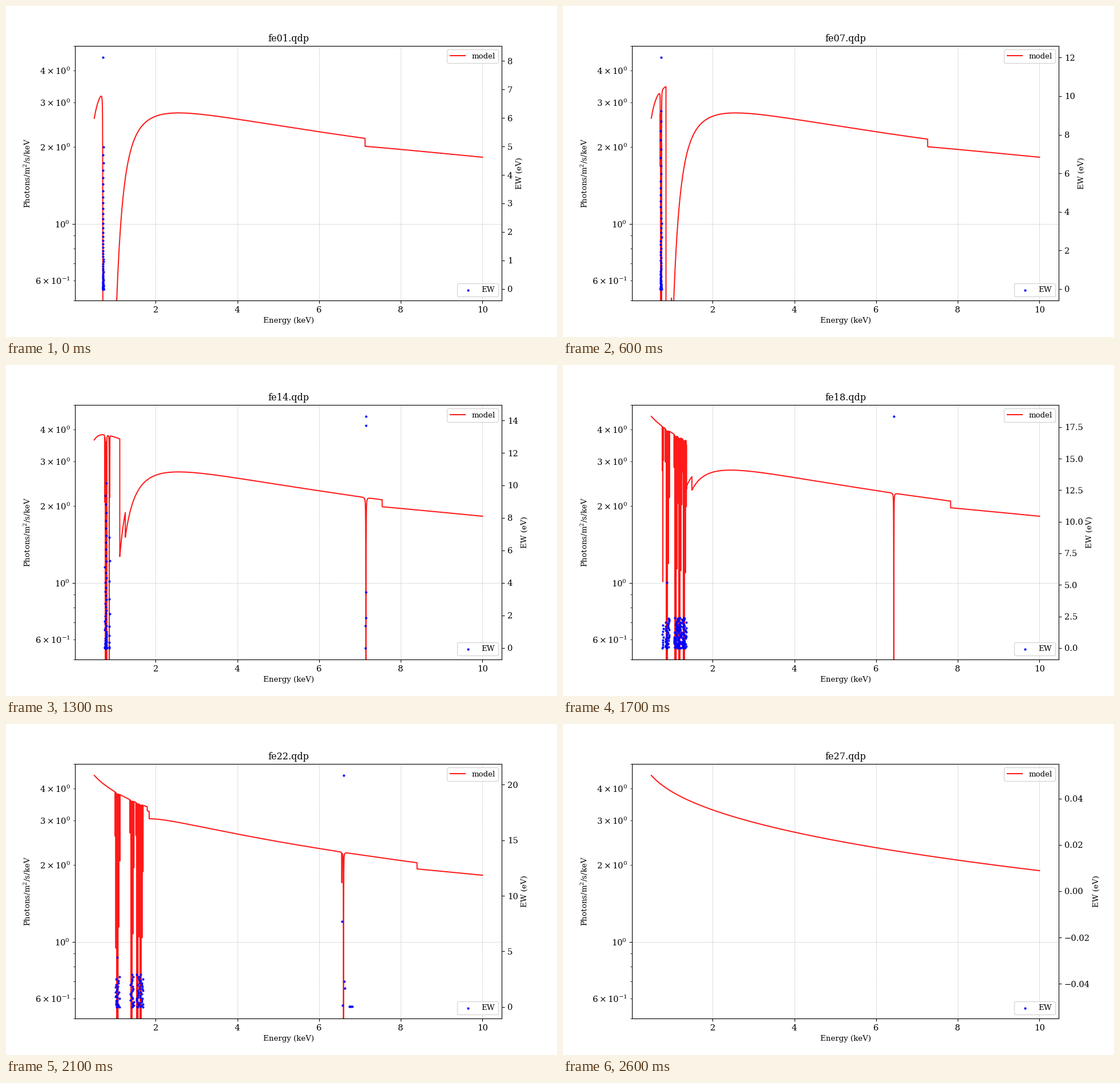
Animation of 966 by 580 pixels, one loop 2.7 s. Source, as a matplotlib script:

```python
import numpy as np
import matplotlib.pyplot as plt
from matplotlib.animation import FuncAnimation

DPI = 96.6
IONS = 27
DEEP = 6.0
GRID = np.linspace(0.5, 10, 16001)

plt.rcParams.update({"font.family": "serif", "font.serif": ["DejaVu Serif"],
                     "mathtext.fontset": "dejavuserif"})


def by_ion(n, ions, values):
    return np.interp(n, ions, values)


def electrons(n, closed, room):
    """Electrons of ion n in a shell with the given room above closed shells."""
    return np.clip(IONS - closed - n, 0, room)


def continuum(e):
    return np.exp(np.polyval([-0.0082, -0.0199, -0.2210, 1.3578], np.log(e)))


def l_edge(n):
    return by_ion(n, [1, 4, 10, 14, 18, 22, 24],
                  [0.715, 0.762, 0.957, 1.124, 1.359, 1.795, 2.04])


def k_edge(n):
    return by_ion(n, [1, 4, 10, 14, 18, 22, 25, 26],
                  [7.126, 7.168, 7.357, 7.545, 7.824, 8.397, 8.828, 9.278])


def edge_depth(n, e):
    """Optical depth of the M, L and K shells without lines."""
    m_part = min(0.071 * electrons(n, 10, 16), 0.55) * (0.5 / e) ** 2.4
    shell = (0.96 * e ** -2.2 + 1.66 * e ** -7.2) / 8
    p_part = electrons(n, 4, 6) * shell
    l_part = electrons(n, 2, 8) * shell
    k_part = 0.042 * electrons(n, 0, 2) * (7.126 / e) ** 2.1

    p_edge = l_edge(n)
    s_edge = p_edge + np.clip(0.024 * (24 - n), 0, 0.135)
    tau = np.where(e < s_edge, np.maximum(p_part, m_part), l_part)
    tau = np.where(e < p_edge, m_part, tau)
    return np.where(e < k_edge(n), tau, k_part)


def cloud(rng, lo, hi, count, top, power):
    """EW points: random energies, strengths falling from top to zero."""
    strengths = top * np.linspace(1, 0, count) ** power
    return np.column_stack([rng.uniform(lo, hi, count), strengths])


def crowded_lines(n, rng):
    """Inner-shell lines of low ions, packed just below the L edge."""
    ions = [1, 4, 10, 14, 16]
    lo = by_ion(n, ions, [0.707, 0.709, 0.732, 0.755, 0.77])
    hi = by_ion(n, ions, [0.722, 0.728, 0.768, 0.802, 0.82])
    peak = by_ion(n, [1, 4, 10, 12, 14], [8.125, 8.86, 15.17, 16.8, 10.15])
    body = peak * by_ion(n, [4, 10], [0.65, 0.98])
    dots = cloud(rng, lo, hi, 70, body, 4)
    dots[0, 1] = peak
    spikes = [(e, DEEP) for e in np.linspace(lo, hi, 4)[1:]] + [(lo, 0.6)]
    if n >= 12:
        side = 0.866 + 0.012 * (n - 14)
        dots = np.vstack([dots, cloud(rng, side - 0.002, side + 0.008, 10, 6.8, 2)])
        spikes += [(side, DEEP), (side + 0.014, 0.55)]
    return dots, spikes


def band_lines(n, rng):
    """Five separate bands of lines, drifting to higher energy with charge."""
    t = (n - 18) / 4
    first = np.array([0.768, 0.846, 1.058, 1.149, 1.261])
    last = np.array([1.013, 1.030, 1.373, 1.519, 1.596])
    dots, spikes = [], []
    for i, lo in enumerate(first + (last - first) * t):
        weak = i == 0
        hi = lo + (0.03 if weak else 0.096)
        count = 3 + int((1 if weak else 6) * electrons(n, 2, 8))
        band = cloud(rng, lo, hi, count, 1.8 if weak else 2.4 + 0.5 * t, 1.3)
        if i == 1:
            band[0] = lo + 0.03, 5.2 - 0.75 * t
        dots.append(band)
        depths = (0.4, 1.4, 0.3) if weak else (0.3, DEEP, DEEP, 1.2, 0.6)
        spikes += list(zip(np.linspace(lo, hi, len(depths)), depths))
    return np.vstack(dots), spikes


def k_lines(n):
    """K-shell lines as (E, EW) rows."""
    peak = by_ion(n, [10, 14, 18, 22, 25, 26], [9.18, 14.25, 18.35, 20.84, 25.5, 17.5])
    if n < 18:
        centre = 7.09 + 0.0145 * (n - 10)
        shares = [1] if n < 12 else [1, 0.96, 0.24, 0.13, 0.095, 0]
        return [(centre - (0.012 if s < 0.1 else 0), peak * s) for s in shares]
    centre = by_ion(n, [18, 22, 25, 26], [6.435, 6.599, 6.70, 6.97])
    if n < 25:
        rows = [(centre, peak)]
        if n > 18:
            rows += [(centre - 0.042, 0.37 * peak), (centre + 0.014, 0.11 * peak),
                     (centre + 0.028, 0.08 * peak), (centre - 0.028, 0.15)]
            rows += [(centre + d, 0.04) for d in np.linspace(0.14, 0.21, 4)]
        return rows
    limit = k_edge(n)
    return [(limit - (limit - centre) * (2 / k) ** 2, peak * (2 / k) ** 3.5)
            for k in range(2, 9)]


def build(n):
    """Model curve and EW points of ion n."""
    if n == IONS:
        return GRID, continuum(GRID), np.empty((0, 2))
    rng = np.random.default_rng(n)
    dots, spikes = np.empty((0, 2)), []
    if n < 17:
        dots, spikes = crowded_lines(n, rng)
    elif n < 25:
        dots, spikes = band_lines(n, rng)
    width = 0.0015 * np.exp(-n / 14)
    lines = [(e, depth, width) for e, depth in spikes]
    if n >= 9:
        rows = k_lines(n)
        dots = np.vstack([dots, rows])
        lines += [(e, min(DEEP, (w / 10) ** 5), 0.0012) for e, w in rows]

    e = np.union1d(GRID, [row[0] for row in lines])
    tau = edge_depth(n, e)
    for centre, depth, w in lines:
        tau += depth / (1 + ((e - centre) / w) ** 2)
    return e, continuum(e) * np.exp(-np.minimum(tau, DEEP)), dots


fig, ax = plt.subplots(figsize=(966 / DPI, 580 / DPI), dpi=DPI)
ew_ax = ax.twinx()

line, = ax.plot([], [], color="red", lw=1.5, alpha=0.9, label="model")
points = ew_ax.scatter([], [], s=10, color="blue", linewidths=0, alpha=0.9, label="EW")

ax.set_yscale("log")
ax.set_xlim(0.025, 10.475)
ax.set_ylim(0.5, 5)
ax.grid(True, color="gray", ls=":", lw=0.5)
ax.set_xlabel("Energy (keV)")
ax.set_ylabel("Photons/m$^2$/s/keV")
ew_ax.set_ylabel("EW (eV)")
ax.tick_params(which="both", labelsize=11)
ew_ax.tick_params(labelsize=11)
title = ax.set_title("")
ax.legend(loc="upper right")
ew_ax.legend(loc="lower right")

SPECTRA = [build(n) for n in range(1, IONS + 1)]


def update(i):
    e, flux, dots = SPECTRA[i]
    line.set_data(e, flux)
    points.set_offsets(dots)
    if len(dots):
        top = dots[:, 1].max()
        ew_ax.set_ylim(-0.05 * top, 1.05 * top)
    else:
        ew_ax.set_ylim(-0.055, 0.055)
    title.set_text(f"fe{i + 1:02d}.qdp")
    return line, points, title


anim = FuncAnimation(fig, update, frames=IONS, interval=100, repeat=True,
                     repeat_delay=0, blit=False)
plt.show()
```
